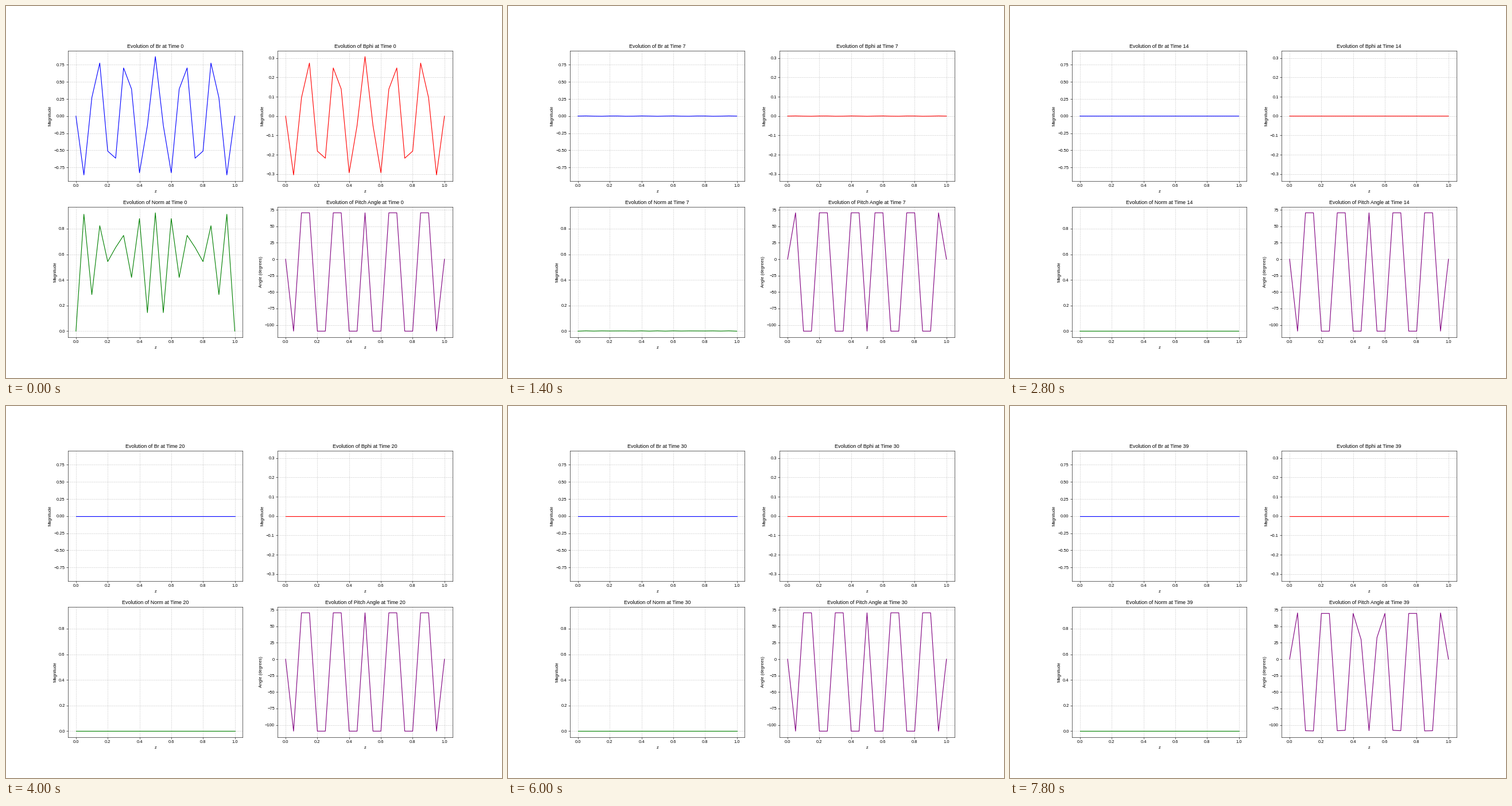
A matplotlib script for the animation above (8000 ms loop, 864 by 648 pixels).

```python
import numpy as np
import matplotlib.pyplot as plt
from matplotlib.animation import FuncAnimation

plt.rcParams["font.family"] = "Liberation Sans"

FRAMES, INTERVAL = 40, 200
AMP_R, AMP_PHI = 0.871, 0.308
GAIN = -0.43        # per-step factor of the driven mode (Crank-Nicolson flips its sign)
SLOW = 0.95         # per-step factor of the slow residual modes
LAST = FRAMES - 1

z = np.linspace(0, 1, 21)
mode = -np.sin(11 * np.pi * z)
first, second = np.sin(np.pi * z), np.sin(2 * np.pi * z)
amp = np.hypot(AMP_R, AMP_PHI)
ur, uphi = AMP_R / amp, AMP_PHI / amp


def fields(step):
    """Radial and azimuthal field, norm and pitch angle at one time step."""
    residual = abs(GAIN) ** LAST * SLOW ** (step - LAST)
    along = GAIN ** step * mode - residual * (0.1409 * first + 0.003 * second)
    across = -0.0142 * residual * first
    br = amp * (along * ur + across * uphi)
    bphi = amp * (along * uphi - across * ur)
    br[[0, -1]] = bphi[[0, -1]] = 0.0
    return br, bphi, np.hypot(br, bphi), np.degrees(np.arctan2(br, bphi))


PANELS = [
    ("Br", "Magnitude", "blue"),
    ("Bphi", "Magnitude", "red"),
    ("Norm", "Magnitude", "green"),
    ("Pitch Angle", "Angle (degrees)", "purple"),
]

fig, axes = plt.subplots(2, 2, figsize=(16, 12), dpi=54)
axes = axes.ravel()
lines = []
for ax, (name, label, color), data in zip(axes, PANELS, fields(0)):
    lines += ax.plot(z, data, color=color)
    ax.set_xlabel("z")
    ax.set_ylabel(label)
    ax.grid(True, linestyle="--", alpha=0.7)
    ax.set_xlim(ax.get_xlim())
    ax.set_ylim(ax.get_ylim())


def update(step):
    for ax, line, panel, data in zip(axes, lines, PANELS, fields(step)):
        line.set_ydata(data)
        ax.set_title(f"Evolution of {panel[0]} at Time {step}")
    return lines


anim = FuncAnimation(fig, update, frames=FRAMES, interval=INTERVAL,
                     init_func=lambda: update(0), repeat=True, repeat_delay=0)
plt.show()
```
